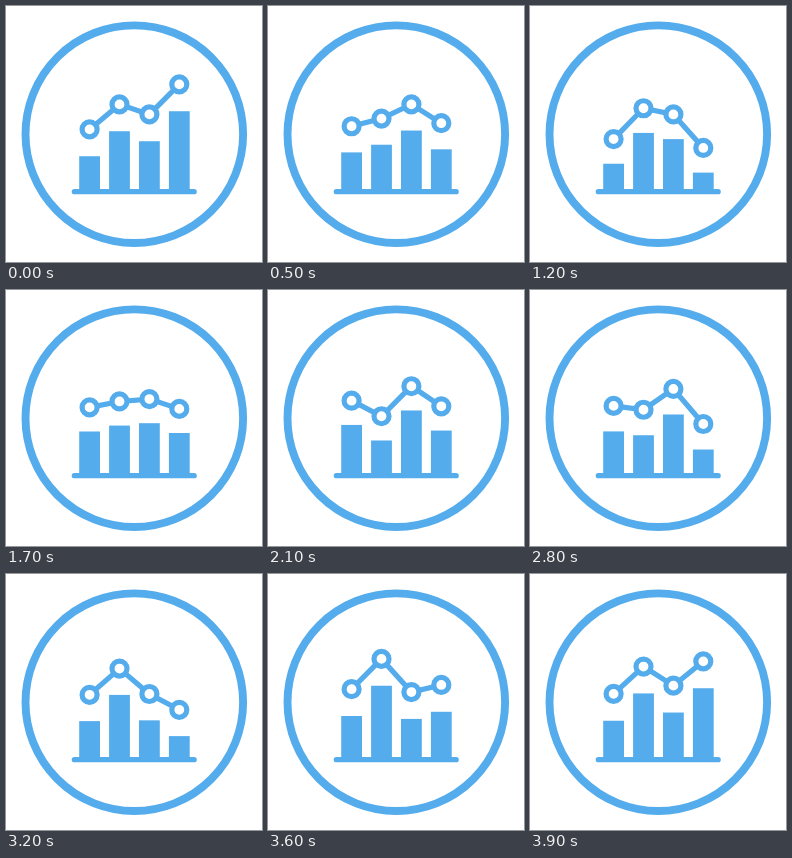
These frames come from a looping animation (256 px wide and 256 px high, 4000 ms). An HTML page:

```html
<!DOCTYPE html>
<html lang="en">
<head>
<meta charset="utf-8">
<title>Chart icon</title>
<style>
  html, body { margin: 0; width: 100%; height: 100%; overflow: hidden; background: #fff; }
  svg { display: block; width: 100vw; height: 100vh; }
</style>
</head>
<body>
<svg viewBox="0 0 256 256" fill="none" stroke="#54acec" stroke-width="5.2">
  <circle cx="128.3" cy="128.2" r="108.8" stroke-width="7.9"/>
  <path d="M68.3 185.7H188.2" stroke-linecap="round"/>
  <g id="bars" fill="#54acec" stroke="none"></g>
  <polyline id="line"/>
  <g id="dots" fill="#fff"></g>
</svg>
<script>
const LOOP = 4000, STEP = 100, BEAT = 620, BASE = 185;

// Marker heights of the four columns, one pose per beat
const poses = [
  [123.4, 98.4, 108.4, 78.4],
  [119.5, 116, 96, 126.5],
  [134, 101.3, 109.3, 143],
  [111.6, 115, 109, 110.5],
  [109.2, 144, 76, 125.5],
  [122.2, 97, 120.5, 142],
  [113.5, 82, 117.5, 103.5]
];

const $ = id => document.getElementById(id);

function add(parent, tag, attrs) {
  const el = document.createElementNS("http://www.w3.org/2000/svg", tag);
  for (const k in attrs) el.setAttribute(k, attrs[k]);
  return parent.appendChild(el);
}

const columns = poses[0].map((_, i) => {
  const x = 83.6 + 29.9 * i;
  return {
    x,
    bar: add($("bars"), "rect", { x: x - 10.4, width: 20.8 }),
    dot: add($("dots"), "circle", { cx: x, r: 7.5 })
  };
});

function draw(t) {
  // The last beat is cut short by the end of the loop
  const n = Math.floor(t / BEAT), from = n * BEAT;
  const k = (t - from) / (Math.min(from + BEAT, LOOP) - from);
  const a = poses[n], b = poses[(n + 1) % poses.length];

  // Bars follow their markers at a slightly breathing distance
  const gap = 25.5 + 1.4 * Math.cos(2 * Math.PI * (t + 200) / LOOP);

  const points = columns.map(({ x, bar, dot }, i) => {
    const y = a[i] + (b[i] - a[i]) * k;
    dot.setAttribute("cy", y);
    bar.setAttribute("y", y + gap);
    bar.setAttribute("height", BASE - y - gap);
    return x + "," + y;
  });
  $("line").setAttribute("points", points.join(" "));
}

const start = performance.now();
function tick() {
  const t = (performance.now() - start) % LOOP;
  draw(Math.floor(t / STEP) * STEP);
  requestAnimationFrame(tick);
}
tick();
</script>
</body>
</html>
```
